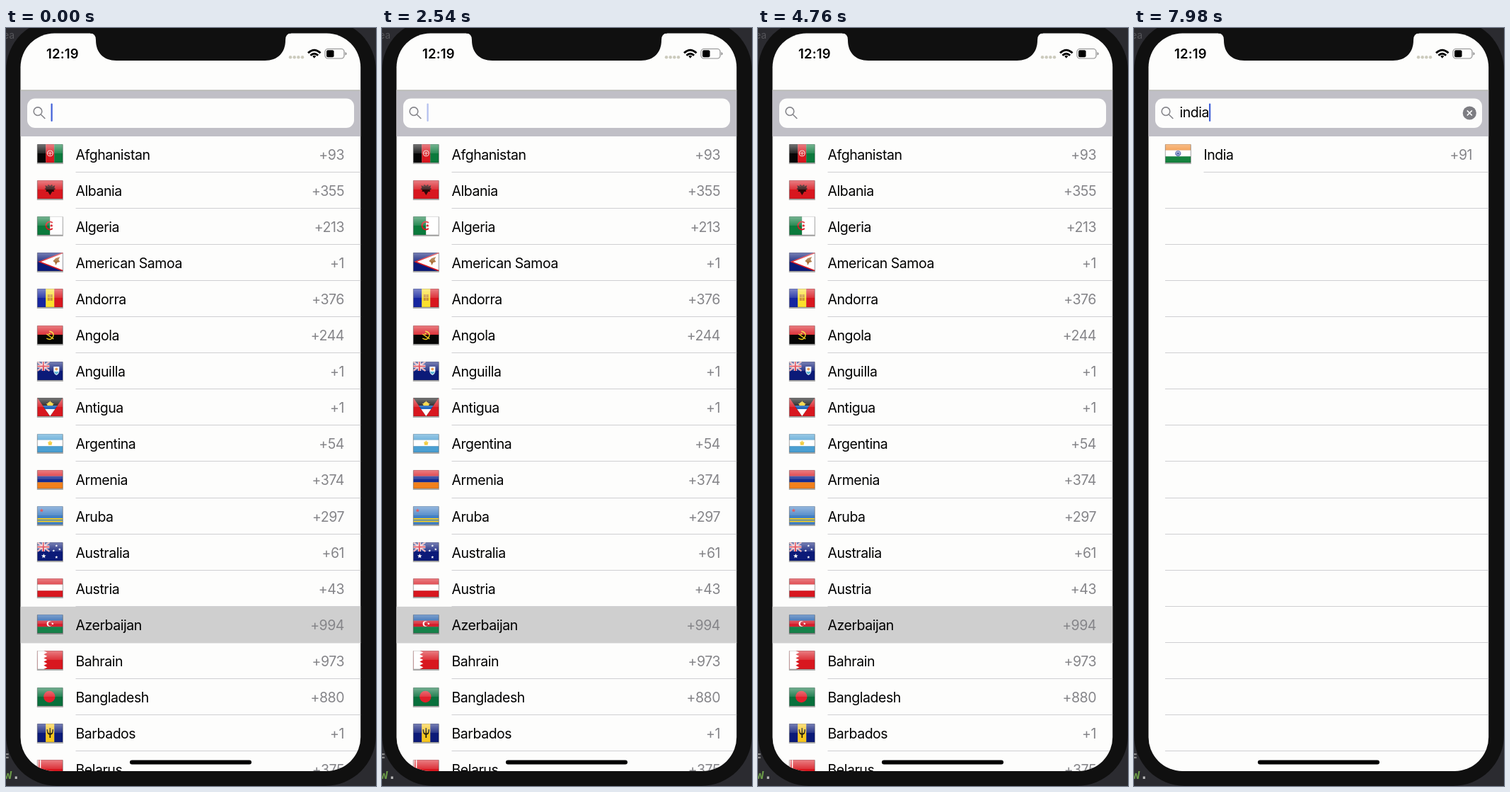
Animation, 523 px wide and 1070 px high, one loop 8000 ms. Source, as an HTML page:

```html
<!DOCTYPE html>
<html lang="en">
<head>
<meta charset="utf-8">
<title>Country code search</title>
<style>
  html, body { margin: 0; width: 100%; height: 100%; overflow: hidden; background: #2b2b30; }
  svg { display: block; }
  text { font: 19.5px Inter, Roboto, sans-serif; letter-spacing: -.46px; white-space: pre; }
  .code { fill: #858589; text-anchor: end; }
  .time { font-size: 18.5px; font-weight: 600; letter-spacing: .2px; }
  .editor { font: bold 19px "DejaVu Sans Mono", monospace; letter-spacing: 0; }
  .tab { font: 14px Inter, Roboto, sans-serif; letter-spacing: 0; }
</style>
</head>
<body>
<svg width="523" height="1070" viewBox="0 0 523 1070">
  <defs>
    <clipPath id="screen"><rect x="20.5" y="7.5" width="480.7" height="1041.5" rx="48"/></clipPath>
    <clipPath id="flag"><rect width="36" height="26"/></clipPath>
    <linearGradient id="gloss" x2="0" y2="1">
      <stop stop-color="#fff" stop-opacity=".45"/>
      <stop offset="1" stop-color="#fff" stop-opacity=".12"/>
    </linearGradient>
  </defs>

  <rect width="523" height="1070" fill="#2b2b30"/>
  <text class="tab" x="-4" y="15" fill="#55555a">ea</text>
  <text class="editor" x="-7" y="1034" fill="#8a8a8a">=</text>
  <text class="editor" x="-3" y="1060" fill="#6b9a48">w<tspan fill="#bbb">.</tspan></text>
  <rect y="-12" width="523" height="1082" rx="72" fill="#101010"/>

  <g clip-path="url(#screen)">
    <rect x="20" y="7" width="482" height="1043" fill="#fdfdfc"/>
    <g id="list"></g>
    <rect x="20" y="87.5" width="482" height="65.5" fill="#c0bfc6"/>
    <path d="M20 88H502" stroke="#b4b5aa"/>
    <rect x="30" y="99.5" width="462" height="41.5" rx="11" fill="#fdfdfc"/>
    <g fill="none" stroke="#85858a" stroke-width="1.6">
      <circle cx="45" cy="117.7" r="5.8"/><path d="M49.2 122L55.3 128"/>
    </g>
    <text id="query" x="64.5" y="126"></text>
    <rect id="caret" y="106.5" width="2.2" height="25.5" rx="1" fill="#3f5fd8"/>
    <g id="clear">
      <circle cx="474.3" cy="120" r="9.6" fill="#7d7d82"/>
      <path d="M470.8 116.5l7 7m0-7l-7 7" stroke="#fff" stroke-width="1.7"/>
    </g>
    <rect x="175" y="1033.5" width="172" height="6" rx="3"/>
  </g>

  <path d="M119 6V7.500q8 0 8 9.500c0 18 11 29 29 29H366c18 0 29-11 29-29q0-9.500 8-9.500V6z" fill="#101010"/>
  <text class="time" x="57" y="43">12:19</text>
  <g fill="#cccbbd">
    <circle cx="402" cy="41.3" r="2.2"/><circle cx="407.7" cy="41.3" r="2.2"/>
    <circle cx="413.3" cy="41.3" r="2.2"/><circle cx="419" cy="41.3" r="2.2"/>
  </g>
  <g fill="none" stroke="#000" stroke-width="2.8">
    <path d="M427 35.3Q435.7 27 444.5 35.3M430.4 38.8Q435.7 33.8 441.1 38.8"/>
    <path d="M433.2 39.8Q435.7 37.8 438.3 39.8L435.7 42.7z" fill="#000" stroke="none"/>
  </g>
  <rect x="451" y="29.5" width="27" height="13.5" rx="4" fill="none" stroke="#8d8d8d" stroke-width="1.2"/>
  <rect x="453" y="31.3" width="10.5" height="10" rx="2"/>
  <path d="M479.5 34q2 .5 2 2.3t-2 2.3z" fill="#8d8d8d"/>
</svg>

<script>
const LOOP = 8000, TOP = 153, ROW = 51.1, ROWS = 18;
const $ = id => document.getElementById(id);

// Flag drawing helpers, on a 36 by 26 field
const rect = (x, y, w, h, c) => `<rect x="${x}" y="${y}" width="${w}" height="${h}" fill="${c}"/>`;
const dot = (x, y, r, c) => `<circle cx="${x}" cy="${y}" r="${r}" fill="${c}"/>`;
const shape = (d, c) => `<path d="${d}" fill="${c}"/>`;
const line = (d, c, w = 1) => `<path d="${d}" fill="none" stroke="${c}" stroke-width="${w}"/>`;
const plain = c => rect(0, 0, 36, 26, c);
const across = (...cs) => cs.map((c, i) => rect(0, i * 26 / cs.length, 36, 26 / cs.length, c)).join('');
const down = (...cs) => cs.map((c, i) => rect(i * 36 / cs.length, 0, 36 / cs.length, 26, c)).join('');
const moon = (x, y, r, c, back) => dot(x, y, r, c) + dot(x + r * .35, y, r * .78, back);
const star = (x, y, r, c) => {
  const pts = Array.from({length: 10}, (_, i) => {
    const a = i * Math.PI / 5, k = i % 2 ? r * .42 : r;
    return `${(x + k * Math.sin(a)).toFixed(2)} ${(y - k * Math.cos(a)).toFixed(2)}`;
  });
  return shape(`M${pts.join('L')}z`, c);
};
const cross = 'M8.5 0V13M0 6.5H17';
const jack = line('M0 0L17 13M17 0L0 13', '#fff', 2.2) + line('M0 0L17 13M17 0L0 13', '#d8202f', .8) +
  line(cross, '#fff', 4) + line(cross, '#d8202f', 2.2);

const RED = '#d8171f', NAVY = '#0b1a78', GREEN = '#0b7a3c', GOLD = '#f7d020', WHITE = '#fff';
const countries = [
  ['Afghanistan', 93, down('#050505', RED, GREEN) + line('M18 9a4 4 0 1 0 .1 0M15 13h6M18 11v5', '#f3c4c0', 1.2)],
  ['Albania', 355, plain(RED) + shape('M18 8l-2-2-2 1 2 2-5-2 1 4-2 1 3 2-1 2 3 0 3 5 3-5 3 0-1-2 3-2-2-1 1-4-5 2 2-2-2-1z', '#2a0808')],
  ['Algeria', 213, down(GREEN, WHITE) + line('M21.5 9a5.5 5.5 0 1 0 0 8', RED, 2) + star(20, 13, 2.6, RED)],
  ['American Samoa', 1, plain(NAVY) + shape('M3 13L36 0V26z', WHITE) + line('M37 0L3 13L37 26', RED, 1.6) +
    shape('M22 12l4-4 6-2-2 4 2 3-4 1-2 4-1-4z', '#a5672c')],
  ['Andorra', 376, down('#1626a0', '#fbe02c', RED) + rect(14.5, 8, 7, 9, '#c99337') + line('M18 8v9M14.5 12.5h7', '#e8bd4a')],
  ['Angola', 244, across(RED, '#050505') + line('M17 8q8 2 5 8t-9 2M13 12l10 7', GOLD, 1.5) + star(17, 12, 2, GOLD)],
  ['Anguilla', 1, plain(NAVY) + jack + shape('M23 7h8v7q-1 4-4 5-3-1-4-5z', WHITE) +
    shape('M23.5 14h7q-1 3-3.5 4-2.5-1-3.5-4z', '#62b7d8') + dot(27, 10.5, 2, '#e88a32')],
  ['Antigua', 1, plain(RED) + shape('M0 0H36L18 26z', '#0a0a0a') + star(18, 10, 6, GOLD) + dot(18, 10, 4, GOLD) +
    shape('M7.6 11H28.4L25 16H11z', '#2268bd') + shape('M11 16H25L18 26z', WHITE)],
  ['Argentina', 54, across('#4a9fd2', WHITE, '#4a9fd2') + dot(18, 13, 2.7, '#f2cb3d') + star(18, 13, 4, '#f2cb3d')],
  ['Armenia', 374, across(RED, '#162c92', '#f1801c')],
  ['Aruba', 297, plain('#4380c4') + rect(0, 17, 36, 1.8, GOLD) + rect(0, 20.5, 36, 1.8, GOLD) + star(6, 6, 3, RED)],
  ['Australia', 61, plain(NAVY) + jack + star(9, 19.5, 3.5, WHITE) + star(27, 5, 2, WHITE) + star(23, 12, 2, WHITE) +
    star(31.5, 10, 2, WHITE) + star(27, 21, 2.2, WHITE)],
  ['Austria', 43, across(RED, WHITE, RED)],
  ['Azerbaijan', 994, across('#1656a8', '#d5202e', '#16824a') + moon(17, 13, 3.7, WHITE, '#d5202e') + star(21.5, 13, 2, WHITE)],
  ['Bahrain', 973, plain(RED) + shape('M0 0H9L14 2.6 9 5.2 14 7.8 9 10.4 14 13 9 15.6 14 18.2 9 20.8 14 23.4 9 26H0z', WHITE)],
  ['Bangladesh', 880, plain('#08703c') + dot(17, 13, 8.2, '#e0202c')],
  ['Barbados', 1, down(NAVY, '#f7c61d', NAVY) + line('M18 6V20M14 8q0 7 4 7t4-7', '#111', 1.6)],
  ['Belarus', 375, rect(0, 0, 36, 17, RED) + rect(0, 17, 36, 9, GREEN) + rect(0, 0, 5, 26, WHITE) + line('M2.5 0V26', RED, 2)],
  ['Iceland', 354, plain('#123a90') + line('M13 0V26M0 13H36', WHITE, 5) + line('M13 0V26M0 13H36', RED, 2.5)],
  ['India', 91, across('#f28a2c', WHITE, '#15843f') + dot(18, 13, 4, '#9aa6d0') +
    line('M18 9.5a3.5 3.5 0 1 0 .1 0', '#4053a0', .8) + dot(18, 13, 1.2, '#34489a')],
  ['Indonesia', 62, across(RED, WHITE)],
  ['Iran', 98, across('#168a4b', WHITE, RED) + shape('M18 9.5q5 2 3 5l-3 3-3-3q-2-3 3-5z', '#e06464')],
  ['Iraq', 964, across(RED, WHITE, '#050505') + line('M10 13h4m3 0h3m3 0h4M12 11.5v2m6-2v2', '#23904d', 1.4)],
  ['Ireland', 353, down('#0b7a43', WHITE, '#ee7718')],
  ['Isle of Man', 44, plain('#e0182b') + line('M18 13l-3-5-4 2M18 13l6-2-1-4M18 13l-2 5 4 3', '#eadfbd', 2)],
  ['Israel', 972, plain(WHITE) + rect(0, 2, 36, 3.5, '#1c5fae') + rect(0, 20.5, 36, 3.5, '#1c5fae') +
    line('M18 7.5L23 16H13zM18 18.5L13 10H23z', '#1c5fae', 1.5)],
  ['Italy', 39, down('#168a4a', WHITE, RED)],
];

const flagAt = (y, art) => `<g transform="translate(44.3 ${y})">
  ${rect(-.5, .5, 37, 27.5, '#00000055')}<g clip-path="url(#flag)">${art}</g>
  <rect width="36" height="13" fill="url(#gloss)"/>
  <rect x=".25" y=".25" width="35.5" height="25.5" fill="none" stroke="#0003" stroke-width=".7"/></g>`;

function listFor(query) {
  const found = countries.filter(c => c[0].toLowerCase().startsWith(query)).slice(0, ROWS);
  let out = '';
  for (let i = 0; i < ROWS; i++) {
    const y = TOP + i * ROW, item = found[i], lineY = Math.floor(y + ROW) - .5;
    out += line(`M${item ? 98.5 : 44} ${lineY}H502`, '#cfcfd2');
    if (!item) continue;
    const [name, code, art] = item;
    if (name === 'Azerbaijan') out += rect(20, y - .5, 482, ROW + .5, '#cfcfcf');
    out += flagAt(Math.round(y + 11), art) +
      `<text x="98.5" y="${y + 32.5}">${name}</text>` +
      `<text class="code" x="478" y="${y + 32.5}">+${code}</text>`;
  }
  return out;
}

const WORD = 'india', KEYS = [5120, 5960, 6560, 7160, 7660];
const clamp = v => Math.max(0, Math.min(1, v));

// Solid, fade out, pause, fade in
function blink(age) {
  const p = age % 1050;
  return p < 635 ? clamp((500 - p) / 150) : clamp((p - 770) / 150);
}

let shown = null;
function draw(now) {
  const t = now % LOOP;
  const typed = KEYS.filter(k => k <= t).length;
  const query = WORD.slice(0, typed);
  if (query !== shown) {
    shown = query;
    $('list').innerHTML = listFor(query);
    $('query').textContent = query;
    $('clear').style.display = query ? '' : 'none';
    $('caret').setAttribute('x', 63.5 + (query && $('query').getComputedTextLength() + 1));
  }
  $('caret').setAttribute('opacity', blink(t - (typed ? KEYS[typed - 1] : 0)));
}

const start = performance.now();
(function tick() {
  draw(performance.now() - start);
  requestAnimationFrame(tick);
})();
</script>
</body>
</html>
```
